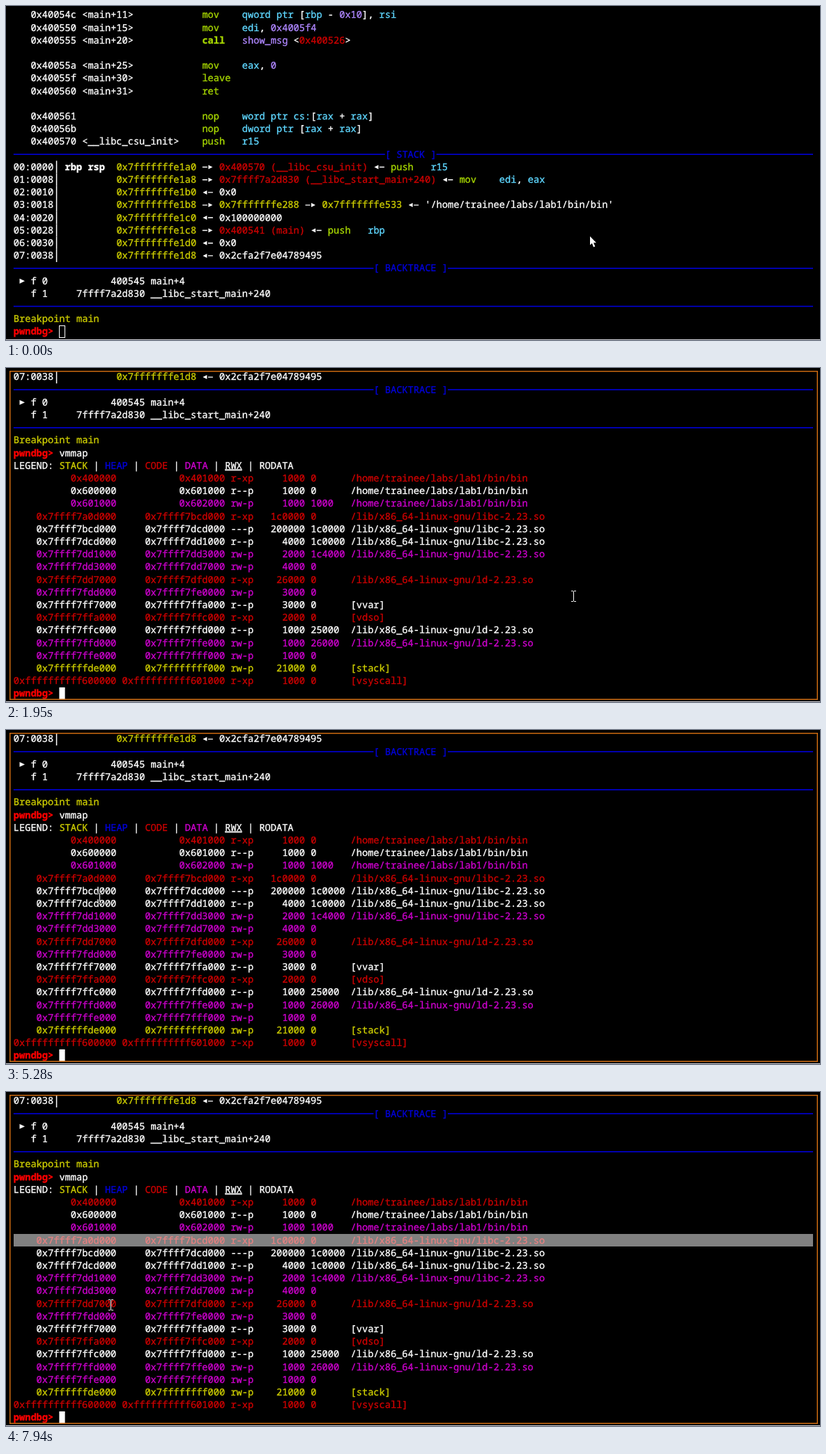
Recreate the animation shown at these times as an HTML page. Size 1168x480 px, loop 8 s.

```html
<!DOCTYPE html>
<html lang="en">
<head>
<meta charset="utf-8">
<title>Debugger session</title>
<style>
  html, body { margin: 0; height: 100%; overflow: hidden; background: #000; }
  svg { display: block; }
  #stage { width: 100vw; height: 100vh; }
  text { font: 13.667px "Noto Sans Mono", "DejaVu Sans Mono", monospace; white-space: pre; text-rendering: geometricPrecision; stroke-width: .35px; }
  .bold { font-weight: bold; }
  .under { text-decoration: underline; }
  #ibeam { mix-blend-mode: difference; }
</style>
</head>
<body>
<svg id="stage" viewBox="0 0 1168 480">
  <rect width="1168" height="480"/>
  <svg y="4" width="1168" height="474" viewBox="0 4 1168 474">
    <g id="screen">
      <g id="lines"></g>
      <text id="typed" fill="#fff" stroke="#fff"></text>
      <rect id="caret" stroke="#fff"/>
    </g>
  </svg>
  <rect id="selection" fill="#fff" fill-opacity=".5"/>
  <rect id="frame" x="5.75" y="4.75" width="1158.5" height="471.5" fill="none" stroke="#cc6a10" stroke-width="1.5"/>
  <rect y="479" width="1168" height="1" fill="#d0d0d8"/>
  <circle id="click" r="11" fill="#d6b900" fill-opacity=".85"/>
  <path id="arrow" d="M0 0V12.6L2.9 10 5 15.4 7.3 14.4 5.1 9.2H9Z" fill="#fff"/>
  <path id="ibeam" d="M-3.5 -7.5H-.5M.5 -7.5H3.5M0 -7V7M-3.5 7.5H-.5M.5 7.5H3.5" fill="none" stroke="#fff"/>
</svg>
<script>
const LOOP = 8000, LEFT = 10.8, TOP = 4, CELL = 8.2, ROW = 18.2, BASELINE = 13.4, RIGHT = 1158;
const PROMPT_ROW = 25, SCROLL = 19, LAST_ROW = 44;
const COLORS = { w: '#fff', r: '#cd0000', y: '#cdcd00', b: '#0000d8', m: '#cd00cd',
                 g: '#a8d800', c: '#5fd7ff', p: '#af87ff', R: '#ff0000', W: '#fff', G: '#a8d800', u: '#fff' };
// Glyph shapes relative to the left edge and middle of a cell
const SHAPES = {
  '—▸': 'M.5-.7H7.5V.7H.5ZM9-3L15-0L9 3Z',
  '◂—': 'M7-3L1 0L7 3ZM8.5-.7H15.5V.7H8.5Z',
  '►': 'M.5-3.6L8 0L.5 3.6Z',
  '│': 'M3.6-9.1H5.1V9.1H3.6Z'
};

const $ = id => document.getElementById(id);
const colX = col => LEFT + col * CELL;
const rowY = row => TOP + row * ROW;
const set = (el, attrs) => { for (const k in attrs) el.setAttribute(k, attrs[k]); return el; };
const add = (tag, attrs) => $('lines').appendChild(set(document.createElementNS('http://www.w3.org/2000/svg', tag), attrs));

// "{x}" switches colour; capitals are bold and u is underlined
const operands = s => '{c}' + s.replace(/0x\w+|\b0\b|[[\],+-]/g, t => `{${/0/.test(t) ? 'p' : 'w'}}${t}{c}`);
const asm = (where, op, args = '') => '   ' + where.padEnd(30) + '{g}' + op.padEnd(7) + operands(args);
const rule = (title = '') => {
  const start = Math.floor((140 - title.length) / 2);
  return '{b}' + '─'.repeat(start) + title + '─'.repeat(140 - start - title.length);
};
const stack = (i, value, regs = '') =>
  `0${i}:00${(i * 8).toString(16).padStart(2, '0')}│{W} ${regs.padEnd(9)}{y}0x7fffffffe1${(0xa0 + i * 8).toString(16)}{w} ${value}`;

const BIN = '/home/trainee/labs/lab1/bin/bin';
const LIB = '/lib/x86_64-linux-gnu/';
const mapping = entry => {
  const [color, from, to, perms, size, offset, name = ''] = entry.split(' ');
  const address = a => (a.length === 4 ? `0x7ffff${a}000` : '0x' + a).padStart(18);
  const path = name === 'bin' ? BIN : /^l/.test(name) ? `${LIB}${name}-2.23.so` : name && `[${name}]`;
  return `{${color}}${address(from)} ${address(to)} ${perms}${size.padStart(9)} ${offset.padEnd(6)} ${path}`;
};

const LINES = [
  asm('0x40054c <main+11>', 'mov', 'qword ptr [rbp - 0x10], rsi'),
  asm('0x400550 <main+15>', 'mov', 'edi, 0x4005f4'),
  '   ' + '0x400555 <main+20>'.padEnd(30) + '{G}call   {p}show_msg {w}<{r}0x400526{w}>',
  '',
  asm('0x40055a <main+25>', 'mov', 'eax, 0'),
  asm('0x40055f <main+30>', 'leave'),
  asm('0x400560 <main+31>', 'ret'),
  '',
  asm('0x400561', 'nop', 'word ptr cs:[rax + rax]'),
  asm('0x40056b', 'nop', 'dword ptr [rax + rax]'),
  asm('0x400570 <__libc_csu_init>', 'push', 'r15'),
  rule('[ STACK ]'),
  stack(0, '—▸ {r}0x400570 (__libc_csu_init){w} ◂— {g}push   {c}r15', 'rbp rsp'),
  stack(1, '—▸ {r}0x7ffff7a2d830 (__libc_start_main+240){w} ◂— {g}mov    ' + operands('edi, eax')),
  stack(2, '◂— 0x0'),
  stack(3, `—▸ {y}0x7fffffffe288{w} —▸ {y}0x7fffffffe533{w} ◂— '${BIN}'`),
  stack(4, '◂— 0x100000000'),
  stack(5, '—▸ {r}0x400541 (main){w} ◂— {g}push   {c}rbp'),
  stack(6, '◂— 0x0'),
  stack(7, '◂— 0x2cfa2f7e04789495'),
  rule('[ BACKTRACE ]'),
  ' ► f 0           400545 main+4',
  '   f 1     7ffff7a2d830 __libc_start_main+240',
  rule(),
  '{y}Breakpoint main',
  '{R}pwndbg>',
  'LEGEND: {y}STACK{w} | {b}HEAP{w} | {r}CODE{w} | {m}DATA{w} | {u}RWX{w} | RODATA',
  ...[
    'r 400000 401000 r-xp 1000 0 bin',
    'w 600000 601000 r--p 1000 0 bin',
    'm 601000 602000 rw-p 1000 1000 bin',
    'r 7a0d 7bcd r-xp 1c0000 0 libc',
    'w 7bcd 7dcd ---p 200000 1c0000 libc',
    'w 7dcd 7dd1 r--p 4000 1c0000 libc',
    'm 7dd1 7dd3 rw-p 2000 1c4000 libc',
    'm 7dd3 7dd7 rw-p 4000 0',
    'r 7dd7 7dfd r-xp 26000 0 ld',
    'm 7fdd 7fe0 rw-p 3000 0',
    'w 7ff7 7ffa r--p 3000 0 vvar',
    'r 7ffa 7ffc r-xp 2000 0 vdso',
    'w 7ffc 7ffd r--p 1000 25000 ld',
    'm 7ffd 7ffe rw-p 1000 26000 ld',
    'm 7ffe 7fff rw-p 1000 0',
    'y 7ffffffde000 7ffffffff000 rw-p 21000 0 stack',
    'r ffffffffff600000 ffffffffff601000 r-xp 1000 0 vsyscall'
  ].map(mapping),
  '{R}pwndbg>'
];

function drawToken(token, col, row, style) {
  const x = colX(col), middle = rowY(row) + ROW / 2, fill = COLORS[style];
  if (token[0] === '─') {
    add('rect', { x, y: middle - .9, width: Math.min(RIGHT, x + token.length * CELL) - x, height: 1.6, fill });
  } else if (SHAPES[token]) {
    add('path', { d: SHAPES[token], transform: `translate(${x} ${middle})`, fill });
  } else {
    const cls = style === 'u' ? 'under' : /[A-Z]/.test(style) ? 'bold' : '';
    add('text', { x, y: rowY(row) + BASELINE, fill, stroke: fill, class: cls }).textContent = token;
  }
}

LINES.forEach((line, row) => {
  let col = 0, style = 'w';
  line.split(/\{(\w)\}/).forEach((part, i) => {
    if (i % 2) { style = part; return; }
    for (const m of part.matchAll(/—▸|◂—|►|│|─+|[^\s│─]+/g)) drawToken(m[0], col + m.index, row, style);
    col += part.length;
  });
});

// Pointer glides: start, end, steps, easing, then start, control and end points
const easeOut = u => 1 - (1 - u) ** 2.6;
const smooth = u => u * u * (3 - 2 * u);
const linear = u => u;
const GLIDES = [
  [230, 480, 4, easeOut, [838, 331], [826, 329], [818.5, 327.5]],
  [1250, 1250, 1, linear, [818.5, 327.5], [816, 327.5], [814.5, 327.5]],
  [2870, 3190, 5, smooth, [814.5, 327.5], [350, 80], [283.5, 199]],
  [3570, 3730, 3, linear, [283.5, 199], [225, 255], [178.5, 318.5]],
  [4110, 4590, 7, easeOut, [178.5, 318.5], [205, 311], [233.5, 306]],
  [4820, 5460, 9, smooth, [233.5, 306], [165, 262], [101.5, 220.5]],
  [6780, 7400, 9, linear, [101.5, 220.5], [124, 242], [144.5, 283.5]],
  [7710, 7940, 4, linear, [144.5, 283.5], [147, 295], [150.5, 305.5]]
];
const TYPED = [[0, ''], [1250, 'v'], [1400, 'vm'], [1710, 'vmmap']];
const CLICKS = [[310, 480, 819, 328], [5820, 5900, 98, 219], [5980, 6300, 98, 219]];

function pointerAt(t) {
  const glide = GLIDES.findLast(g => t >= g[0]);
  if (!glide) return GLIDES[0][4];
  const [start, end, steps, ease, a, b, c] = glide;
  const gap = (end - start) / Math.max(1, steps - 1);
  const step = gap ? Math.min(steps, Math.floor((t - start) / gap + 1.001)) : steps;
  const u = ease(step / steps), v = 1 - u;
  return a.map((p, i) => v * v * p + 2 * u * v * b[i] + u * u * c[i]);
}

const show = (id, on) => { $(id).style.display = on ? '' : 'none'; };
set($('typed'), { x: colX(8), y: rowY(PROMPT_ROW) + BASELINE });

function draw(t) {
  const focused = t >= 310, mapped = t >= 1950;
  const word = TYPED.findLast(s => t >= s[0])[1];
  set($('screen'), { transform: `translate(0 ${mapped ? -SCROLL * ROW : 0})` });
  $('typed').textContent = word;

  const x = colX(mapped ? 8 : 8 + word.length), y = rowY(mapped ? LAST_ROW : PROMPT_ROW);
  set($('caret'), focused
    ? { x, y, width: CELL, height: ROW - .5, fill: '#fff', 'stroke-width': 0 }
    : { x: 76.5, y: 459.5, width: 8, height: 17, fill: 'none', 'stroke-width': 1 });
  show('frame', focused);

  show('selection', t >= 5980);
  const [from, to] = t >= 6150 ? [11, RIGHT] : [colX(4), colX(18)];
  set($('selection'), { x: from, y: 204, width: to - from, height: 18 });

  const click = CLICKS.find(c => t >= c[0] && t < c[1]);
  show('click', click);
  if (click) set($('click'), { cx: click[2], cy: click[3] });

  const [px, py] = pointerAt(t);
  show('arrow', !focused);
  show('ibeam', focused);
  set($('arrow'), { transform: `translate(${px} ${py})` });
  set($('ibeam'), { transform: `translate(${Math.floor(px) + .5} ${Math.round(py)})` });
}

const began = performance.now();
function tick() {
  draw((performance.now() - began) % LOOP);
  requestAnimationFrame(tick);
}
tick();
</script>
</body>
</html>
```
